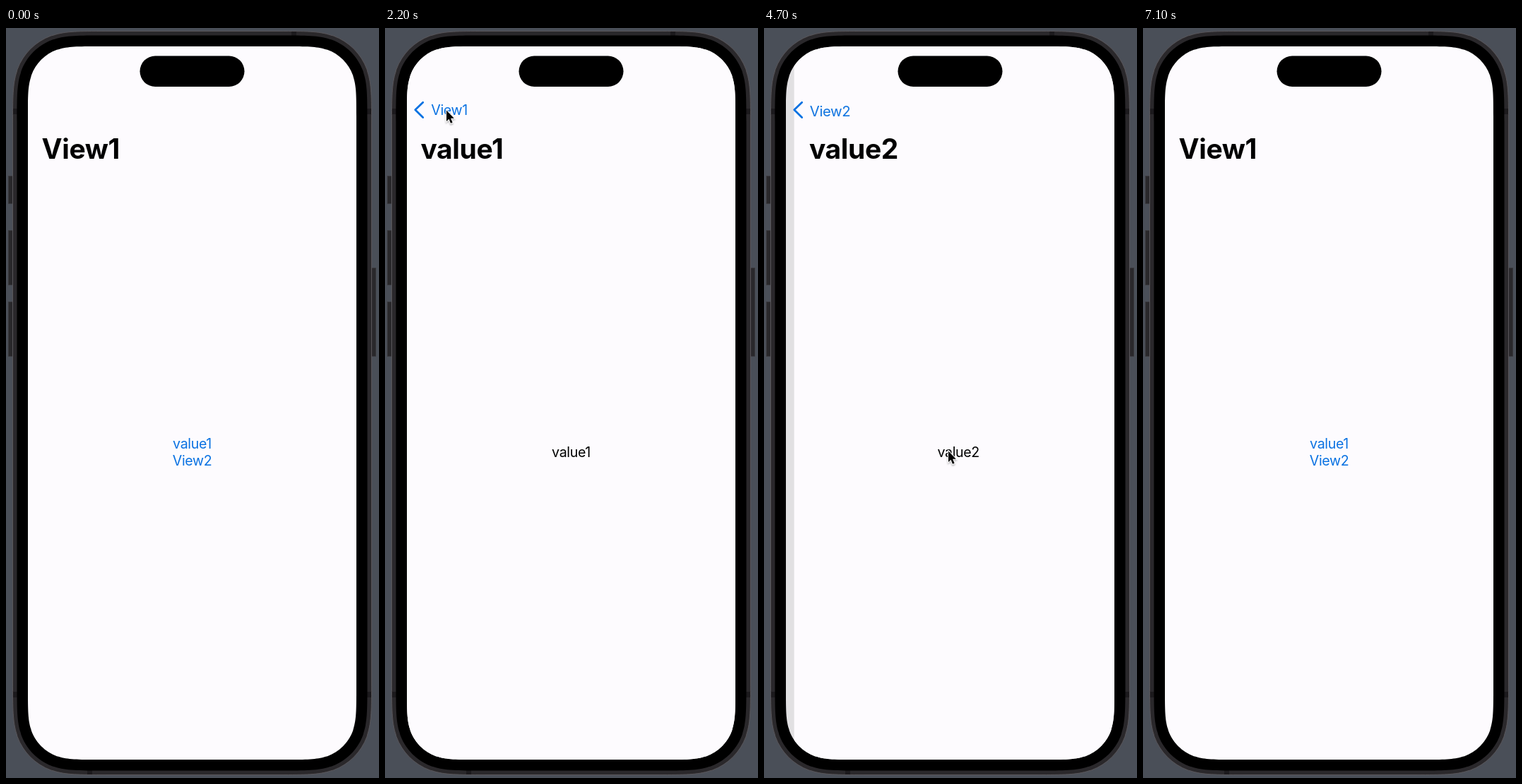
An HTML page that plays this animation: 528x1061 px, repeating every 7.7 s.

```html
<!DOCTYPE html>
<html lang="en">
<head>
<meta charset="utf-8">
<title>Navigation stack</title>
<style>
  html, body { margin: 0; width: 100%; height: 100%; overflow: hidden; background: #4a4f58; }
  svg { display: block; width: 100%; height: 100%; }
  text { font-family: Inter, Roboto, "Liberation Sans", sans-serif; font-optical-sizing: none; letter-spacing: -.018em; }
  .bold { font-weight: 700; letter-spacing: -.01em; }
</style>
</head>
<body>
<svg viewBox="0 0 528 1061">
  <defs>
    <clipPath id="glass"><path id="glassShape"/></clipPath>
    <filter id="soft" x="-50%" y="-50%" width="200%" height="200%">
      <feDropShadow dx="0" dy="1.5" stdDeviation="1.2" flood-opacity=".35"/>
    </filter>
  </defs>
  <rect width="528" height="1061" fill="#4a4f58"/>
  <g fill="#29282b" stroke="#3a393d" stroke-width=".8">
    <rect x="3.4" y="209.4" width="7" height="39"/>
    <rect x="3.4" y="286.4" width="7" height="77"/>
    <rect x="3.4" y="387.4" width="7" height="77"/>
    <rect x="517" y="339.4" width="6.6" height="125"/>
  </g>
  <path id="body" fill="#2a282b" stroke="#59565a"/>
  <g fill="#1c1a1d">
    <rect x="10" y="114" width="6" height="8"/>
    <rect x="511" y="114" width="6" height="8"/>
    <rect x="10" y="939" width="6" height="8"/>
    <rect x="511" y="939" width="6" height="8"/>
    <rect x="404" y="5" width="7" height="6"/>
    <rect x="115" y="1050" width="7" height="6"/>
  </g>
  <path id="bezel" fill="#000"/>
  <g clip-path="url(#glass)">
    <rect x="31" y="26" width="465" height="1009" fill="#fdfbfe"/>
    <g id="view"></g>
  </g>
  <rect x="189.5" y="39.5" width="148" height="43.5" rx="21.75"/>
  <g id="cursor" filter="url(#soft)">
    <path d="M0 .5V16L3.5 12.7L6 18.8L8.6 17.7L6.1 11.7H10.8Z" fill="#000" stroke="#fff" stroke-width="1.8" paint-order="stroke"/>
  </g>
</svg>
<script>
const LOOP = 7700, STEP = 100, LEFT = 31, WIDTH = 465, MID = 263.5;
const BLUE = '#0a72e2', INK = '#000', PAPER = '#fdfbfe';
const TITLE = 39, BODY = 19.6, SHRINK = 52 / 109;
const $ = id => document.getElementById(id);
const lerp = (a, b, k) => a + (b - a) * k;

// Half of a continuous-curvature corner as [along, across], in radii
const CORNER = [
  [1.5287, 0], [1.0885, 0], [.8684, 0], [.6699, .0655], [.6315, .0749], [.3728, .1691]
];

function squircle(x, y, w, h, r) {
  const half = CORNER.map(([a, b]) => [a * r, b * r]);
  const turn = half.concat(half.map(([a, b]) => [b, a]).reverse());
  const corner = (flipX, flipY) => {
    const pts = turn.map(([a, b]) => [flipX ? x + w - a : x + a, flipY ? y + h - b : y + b]);
    return flipX === flipY ? pts.reverse() : pts;
  };
  const trace = pts => {
    const [a, b, c, d, e, f, g, i, j, k, l, m] = pts.map(p => p.join(' '));
    return `${a}C${b} ${c} ${d}L${e}C${f} ${g} ${i}L${j}C${k} ${l} ${m}`;
  };
  const order = [[false, false], [true, false], [true, true], [false, true]];
  return 'M' + order.map(([fx, fy]) => trace(corner(fx, fy))).join('L') + 'Z';
}
$('body').setAttribute('d', squircle(9.5, 4.5, 508, 1052, 86));
$('bezel').setAttribute('d', squircle(15.5, 10.5, 496, 1040, 80));
$('glassShape').setAttribute('d', squircle(31, 26, 465, 1009, 65));

const root = { title: 'View1', rows: ['value1', 'View2'], fill: BLUE };
const leaf1 = { title: 'value1', back: 'View1', rows: ['value1'], fill: INK };
const second = { title: 'View2', back: 'View1', rows: ['value2'], fill: BLUE };
const leaf2 = { title: 'value2', back: 'View2', rows: ['value2'], fill: INK };

// Start time, lower screen, upper screen, push or pop
const moves = [
  [0, root, leaf1, false],
  [1088, root, leaf1, true],
  [2307, root, leaf1, false],
  [3190, root, second, true],
  [4490, second, leaf2, true],
  [5890, second, leaf2, false],
  [6490, root, second, false]
];

// Start, end, pressed label
const presses = [
  [1000, 1300, 'value1'], [2300, 2400, 'back'], [3100, 3400, 'View2'],
  [4400, 4700, 'value2'], [5800, 5900, 'back'], [6400, 6500, 'back']
];

const trail = [
  [100, 221, 716], [400, 262, 640], [600, 276, 596], [800, 271, 583],
  [1400, 271, 583], [1700, 190, 340], [2000, 97, 140], [2200, 87, 116],
  [2500, 87, 116], [2900, 232, 510], [3100, 264.5, 613],
  [3500, 264.5, 613], [4200, 261, 598],
  [4900, 261, 598], [5200, 170, 350], [5500, 73, 90], [5700, 79, 114],
  [7100, 79, 114]
];

function spring(ms) {
  const k = 26.5 * ms / 1000, s = 1 - (1 + k) * Math.exp(-k);
  return s > .999 ? 1 : s;
}

function label(str, x, y, size, fill, opacity = 1, extra = '') {
  return opacity <= 0 ? '' :
    `<text x="${x}" y="${y}" font-size="${size}" fill="${fill}" opacity="${opacity}" ${extra}>${str}</text>`;
}

function rows(screen, dx, pressed) {
  const top = 607 - 12 * (screen.rows.length - 1);
  return screen.rows.map((str, i) => {
    const dim = screen.fill === BLUE && pressed === str ? .35 : 1;
    return label(str, MID + dx, top + 24 * i, BODY, screen.fill, dim, 'text-anchor="middle"');
  }).join('');
}

function chevron(opacity) {
  return `<path d="M53.7 105.2L42.8 115.8L53.7 126.4" fill="none" stroke="${BLUE}" stroke-width="2.8"
    stroke-linecap="round" stroke-linejoin="round" opacity="${opacity}"/>`;
}

// The lower screen's large title turns into the back label
function bar(under, over, p, tap) {
  const q = p ** 1.2, x = lerp(50.5, 65.3, q), y = lerp(185, 123, q);
  let out = '';
  if (under.back) out += label(under.back, 65.3 - 80 * p, 123, BODY, BLUE, (1 - p) ** 2 * tap);
  out += label(under.title, x, y, lerp(TITLE, TITLE * SHRINK, q), INK, 1 - q, 'class="bold"');
  out += label(under.title, x, y, lerp(BODY / SHRINK, BODY, q), BLUE, q * tap);
  out += chevron((under.back ? 1 : Math.max(0, (p - .85) / .15)) * tap);
  if (p > 0) out += label(over.title, 50.5 + WIDTH * 1.153 * (1 - p), 185, TITLE, INK, 1, 'class="bold"');
  return out;
}

function scene(t) {
  const [start, under, over, push] = moves.filter(m => m[0] <= t).pop();
  const s = start ? spring(t - start) : 1, p = push ? s : 1 - s;
  const press = presses.find(a => t >= a[0] && t < a[1]);
  const pressed = press && press[2], shift = WIDTH * (1 - p);
  let out = '';
  if (p < 1) {
    out += rows(under, -.3 * WIDTH * p, pressed);
    out += `<rect x="31" y="26" width="465" height="1009" opacity="${.113 * p}"/>`;
  }
  if (p > 0) {
    out += `<rect x="${LEFT + shift}" y="26" width="465" height="1009" fill="${PAPER}"/>`;
    out += rows(over, shift, pressed);
  }
  return out + bar(under, over, p, pressed === 'back' ? .35 : 1);
}

function pointer(t) {
  const i = trail.findIndex(a => a[0] > t);
  if (i < 1) return null;
  const [t0, x0, y0] = trail[i - 1], [t1, x1, y1] = trail[i];
  const k = (t - t0) / (t1 - t0);
  return [lerp(x0, x1, k), lerp(y0, y1, k)];
}

let shown = -1;
function draw(now) {
  const t = Math.floor(now % LOOP / STEP) * STEP;
  if (t !== shown) {
    shown = t;
    $('view').innerHTML = scene(t);
    const at = pointer(t), cur = $('cursor');
    cur.setAttribute('visibility', at ? 'visible' : 'hidden');
    if (at) cur.setAttribute('transform', `translate(${at[0]} ${at[1]})`);
  }
}

let begin = null;
function tick(now) {
  if (begin === null) begin = now;
  draw(now - begin);
  requestAnimationFrame(tick);
}
draw(0);
requestAnimationFrame(tick);
</script>
</body>
</html>
```
